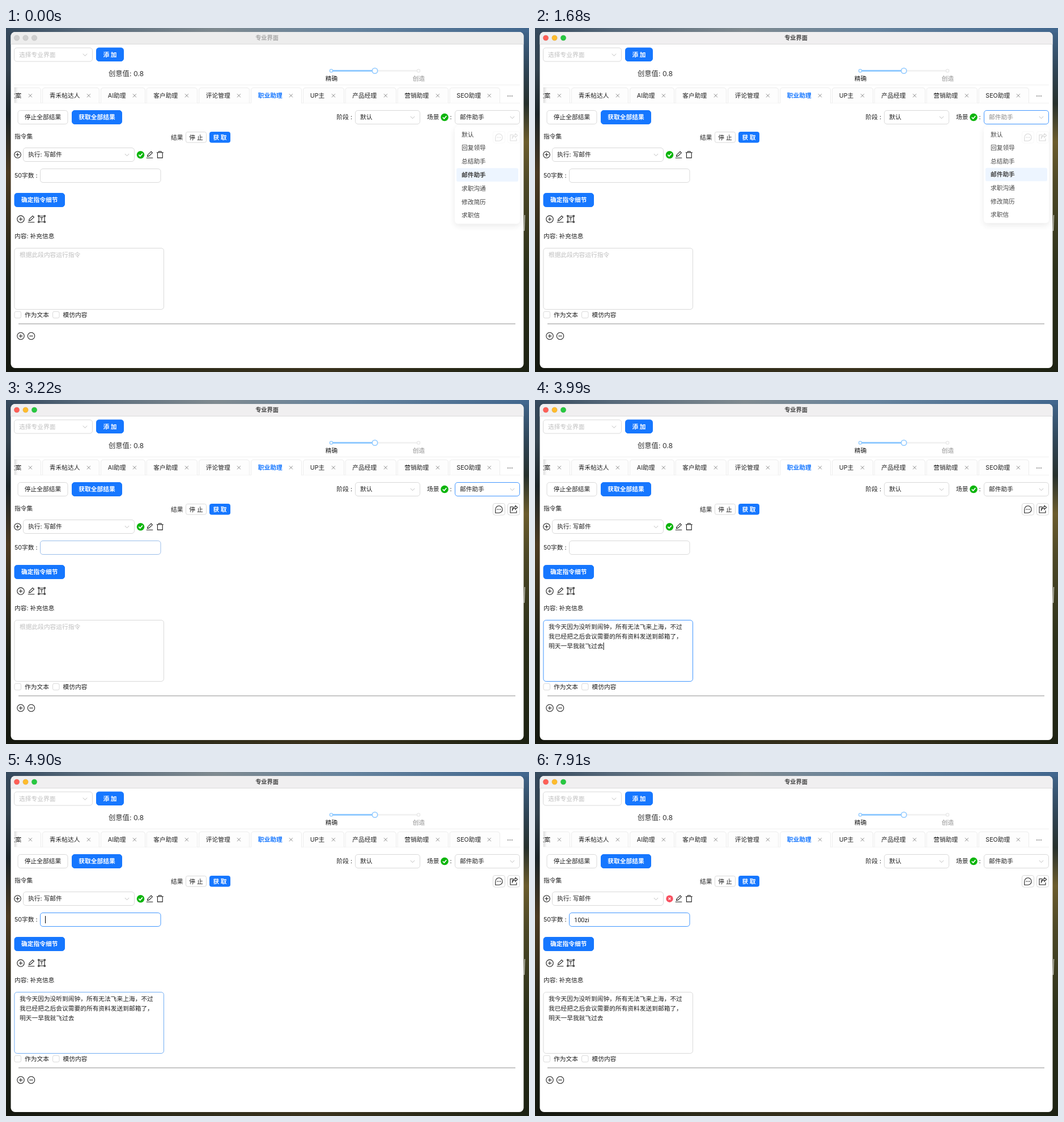
These frames come from a looping animation (923x607 px, 8000 ms). An HTML page:

```html
<!DOCTYPE html>
<html lang="zh-CN">
<head>
<meta charset="utf-8">
<title>专业界面</title>
<style>
html, body { margin: 0; width: 100%; height: 100%; overflow: hidden; background: #222b25; }
svg { display: block; width: 100vw; height: 100vh; }
text { font: 10.72px Inter, "Noto Sans CJK SC", "Noto Sans CJK", sans-serif; white-space: pre; }
#typed { font: 11px Roboto, sans-serif; }
#panel { filter: drop-shadow(0 4.6px 6px rgba(0,0,0,.1)); }
</style>
</head>
<body>
<svg id="stage" viewBox="0 0 923 607" preserveAspectRatio="none"></svg>
<script>
const INK = '#1f1f1f', BLUE = '#1677ff', LINE = '#d9d9d9', MUTED = '#bfbfbf', PALE = '#f0f0f0';

// Drawing helpers; text is placed by its vertical centre.
const label = (x, cy, str, { size = 10.72, color = INK, weight = 400, anchor = 'start', id = '' } = {}) =>
  `<text id="${id}" x="${x}" y="${cy + size * .37}" fill="${color}" text-anchor="${anchor}" style="font-size:${size}px;font-weight:${weight}">${str}</text>`;
const box = (x, y, w, h, { fill = '#fff', stroke = LINE, r = 4.6, id = '' } = {}) =>
  `<rect id="${id}" x="${x}" y="${y}" width="${w}" height="${h}" rx="${r}" fill="${fill}" stroke="${stroke}"/>`;
const circle = (x, y, r, fill, stroke = 'none', width = 1, id = '') =>
  `<circle id="${id}" cx="${x}" cy="${y}" r="${r}" fill="${fill}" stroke="${stroke}" stroke-width="${width}"/>`;
const path = (x, y, d, stroke = INK, width = 1.1) =>
  `<path transform="translate(${x} ${y})" d="${d}" fill="none" stroke="${stroke}" stroke-width="${width}"/>`;

const chevron = (x, y) => path(x, y, 'M-3.6-1.8L0 2 3.6-1.8', MUTED, 1);
const cross = (x, y) => path(x, y, 'M-3-3L3 3M3-3L-3 3', '#8c8c8c', 1);
const plus = (x, y, r = 6.2) => circle(x, y, r, 'none', INK, 1.1) + path(x, y, 'M-3.2 0H3.2M0-3.2V3.2');
const minus = (x, y) => circle(x, y, 6.2, 'none', INK, 1.1) + path(x, y, 'M-3.2 0H3.2');
const pencil = (x, y) => path(x, y, 'M-5.8 5.8H5.8M-4 3L-3.3.2 2.6-5.4 4.9-3.2-1.2 2.4Z');
const check = (x, y) => circle(x, y, 6.8, '#0bb50b') + path(x, y, 'M-3.2 0L-.8 2.5 3.4-2.3', '#fff', 1.7);
const button = (x, y, w, h, str, primary, id, r) =>
  box(x, y, w, h, primary ? { fill: BLUE, stroke: BLUE, id, r } : { r }) +
  label(x + w / 2, y + h / 2, str, { color: primary ? '#fff' : INK, weight: primary ? 600 : 400, anchor: 'middle' });
const select = (x, y, w, str, { color, id = '' } = {}) =>
  box(x, y, w, 24, { id }) + label(x + 8.6, y + 12, str, { color, id: id && id + 'Text' }) + chevron(x + w - 13, y + 12.3);
const gradient = (id, vertical, stops) =>
  `<linearGradient id="${id}" ${vertical ? 'x2="0" y2="1"' : ''}>` +
  stops.map(([at, color]) => `<stop offset="${at}" stop-color="${color}"/>`).join('') + '</linearGradient>';

const wallpaper = () => '<defs>' +
  gradient('sky', false, [[0, '#34485c'], [.15, '#57697a'], [.4, '#7f8a90'], [.65, '#66839d'], [1, '#41668d']]) +
  gradient('leftHill', true, [[0, '#34485c'], [.12, '#33424e'], [.25, '#1b2428'], [.42, '#4b3a22'], [.55, '#3a301d'], [.75, '#1c2016'], [1, '#14170f']]) +
  gradient('rightHill', true, [[0, '#41668d'], [.12, '#2f4556'], [.22, '#26302c'], [.33, '#6b5c2c'], [.45, '#4d4826'], [.7, '#2b3019'], [1, '#1d2213']]) +
  gradient('ground', false, [[0, '#14170f'], [.3, '#2c2a19'], [.6, '#3a321d'], [1, '#1d2213']]) +
  gradient('edge', false, [[0, 'rgba(0,0,0,.13)'], [1, 'rgba(0,0,0,0)']]) +
  '<clipPath id="tabClip"><path d="M14.5 100H908V140H14.5Z"/></clipPath></defs>' +
  '<path fill="url(#leftHill)" d="M0 0H462V607H0Z"/><path fill="url(#rightHill)" d="M462 0H923V607H462Z"/>' +
  '<path fill="url(#sky)" d="M0 0H923V8H0Z"/><path fill="url(#ground)" d="M0 597H923V607H0Z"/>' +
  '<path d="M915.5 330L914.5 358" stroke="#cfd0c8" stroke-width="1.3"/>';

const windowFrame = () =>
  box(8.5, 7, 905, 593, { stroke: 'none', r: 7.5 }) +
  '<path id="titleBar" d="M8.5 28.5V14.5A7.5 7.5 0 0 1 16 7H906A7.5 7.5 0 0 1 913.5 14.5V28.5Z"/>' +
  '<path d="M8.5 28.5H913.5" stroke="#dadada"/>' +
  [19, 34.5, 50].map((x, i) => circle(x, 17.5, 4.8, '#ccc', 'rgba(0,0,0,.12)', .6, 'light' + i)).join('') +
  label(460.5, 17.5, '专业界面', { size: 10.2, weight: 600, anchor: 'middle', id: 'title' });

const header = () =>
  select(14.5, 35, 138, '选择专业界面', { color: MUTED }) + button(159.5, 35, 48, 23.5, '添 加', true) +
  label(181, 80, '创意值: 0.8', { size: 12.3, color: '#333' }) +
  '<path d="M574 75.5H728" stroke="#f2f2f2" stroke-width="3"/><path d="M574 75.5H651" stroke="#91caff" stroke-width="3"/>' +
  circle(574, 75.5, 2.6, '#fff', '#91caff', 1.4) + circle(728, 75.5, 2.6, '#fff', '#e8e8e8', 1.4) +
  circle(651, 75.5, 4.7, '#fff', '#91caff', 1.6) +
  label(574.5, 89, '精确', { anchor: 'middle' }) + label(728.5, 89, '创造', { anchor: 'middle', color: '#8c8c8c' }) +
  `<path d="M14 100.5H907" stroke="${PALE}"/>`;

const TABS = [
  ['文案', -6.5, 61.5], ['青禾帖达人', 64.5, 164.5], ['AI助理', 167.5, 245.5], ['客户助理', 248, 337.5], ['评论管理', 340.5, 429.5],
  ['职业助理', 432.5, 521.5], ['UP主', 524.5, 596.5], ['产品经理', 599, 688.5], ['营销助理', 691, 780.5], ['SEO助理', 783, 871.5]];
const tabs = () => `<g clip-path="url(#tabClip)"><path d="M14 132.5H907" stroke="${PALE}"/>` +
  TABS.map(([name, left, right]) => {
    const active = name === '职业助理';
    return `<path d="M${left} 132.5V110Q${left} 105.5 ${left + 4.6} 105.5H${right - 4.6}Q${right} 105.5 ${right} 110V132.5" fill="${active ? '#fff' : '#fdfdfd'}" stroke="#ececec"/>` +
      (active ? `<path d="M${left + .5} 132.5H${right - .5}" stroke="#fff" stroke-width="1.4"/>` : '') +
      label(left + 12.3, 119, name, active ? { color: BLUE, weight: 600 } : {}) + cross(right - 18.6, 119.3);
  }).join('') + '<path d="M14.5 105H21V132H14.5Z" fill="url(#edge)"/></g>' +
  [886, 889.5, 893].map(x => circle(x, 120, .8, INK)).join('');

const toolbar = () =>
  button(21, 145.5, 88, 24, '停止全部结果') + button(116.5, 145.5, 88, 24, '获取全部结果', true) +
  label(583.5, 157.5, '阶段 :') + select(616.5, 145.5, 114, '默认') +
  label(743, 157.5, '场景') + check(774, 157.5) + label(783.5, 157.5, ':') +
  select(792.5, 145.5, 114, '邮件助手', { id: 'scene' }) +
  label(291, 193, '结果') + button(317.5, 183.5, 36, 18.5, '停 止', false, '', 3) + button(359.5, 183.5, 36, 18.5, '获 取', true, '', 3) +
  box(859.5, 182.5, 21, 20.5, { r: 3.5 }) + box(885.5, 182.5, 21, 20.5, { r: 3.5 }) +
  path(870, 193, 'M-6.2 6.2V0A6.2 6.2 0 1 1 0 6.2Z') + [-2.8, 0, 2.8].map(d => circle(870 + d, 193, .85, INK)).join('') +
  path(896, 193, 'M-1-4.5H-6V6H5V2M-2.6 2.6C-2.4-.5 0-2 3-2V.2L6.7-3.4 3-6.6V-4.5C-.8-4.3-2.8-1.5-2.6 2.6Z');

const form = () =>
  label(15, 191, '指令集') + plus(20.5, 223.5, 5.8) + select(30.5, 211.5, 196, '执行: 写邮件') +
  `<g id="valid">${check(237.5, 223.7)}</g>` +
  `<g id="invalid">${circle(237.5, 223.7, 6.2, '#f8505f') + path(237.5, 223.7, 'M-2-2L2 2M2-2L-2 2', '#fff', 1.2)}</g>` +
  pencil(253.5, 223.5) + path(271.8, 223.5, 'M-6-3.8H6M-2.2-3.8V-5.8H2.2V-3.8M-4.4-3.8V5.6H4.4V-3.8') +
  label(15, 260.5, '50字数 :') + box(60.5, 248.5, 212.5, 24, { id: 'input' }) + label(69, 260.5, '', { size: 11, id: 'typed' }) +
  button(15, 291.5, 88.5, 24, '确定指令细节', true, 'confirm') +
  plus(26, 337.3) + pencil(44.5, 337) +
  path(63, 337, 'M-5-5H5V5H-5ZM-2.8-2.5H2.8M0-2.5V3') +
  [-5.3, 5.3].map(x => [-5.3, 5.3].map(y => box(62 + x, 336 + y, 2, 2, { stroke: INK, r: 0 })).join('')).join('') +
  label(15, 367.5, '内容: 补充信息') + box(14.9, 388.5, 263.6, 108, { id: 'area' }) +
  label(24, 400.5, '根据此段内容运行指令', { color: MUTED, id: 'hint' }) +
  '<g id="note">' + ['我今天因为没听到闹钟，所有无法飞来上海，不过', '我已经把之后会议需要的所有资料发送到邮箱了，', '明天一早我就飞过去']
    .map((line, i) => label(24, 400.5 + i * 17, line)).join('') + '</g>' +
  `<rect id="caret" width="1" height="13" fill="#000"/>` +
  box(15, 500.3, 11.5, 11.5, { r: 2.6 }) + label(33, 506, '作为文本') + box(82.5, 500.3, 11.5, 11.5, { r: 2.6 }) + label(100.5, 506, '模仿内容') +
  '<path d="M22 522H899" stroke="#8e8e8e"/>' + plus(26, 543.5) + minus(44.5, 543.5);

const OPTIONS = ['默认', '回复领导', '总结助手', '邮件助手', '求职沟通', '修改简历', '求职信'];
const dropdown = () => '<g id="menu">' + box(792, 173, 115, 177.6, { stroke: 'none', r: 6, id: 'panel' }) +
  OPTIONS.map((name, i) => {
    const top = 176 + i * 24.5, chosen = name === '邮件助手';
    return (chosen ? box(795, top, 109, 24.5, { fill: '#eaf4ff', stroke: 'none', r: 3 }) : '') +
      label(804, top + 12.25, name, { weight: chosen ? 600 : 400 });
  }).join('') + '</g>';

const stage = document.getElementById('stage');
stage.innerHTML = wallpaper() + windowFrame() + header() + tabs() + toolbar() + form() + dropdown();

const $ = id => document.getElementById(id);
const set = (id, attrs) => { for (const k in attrs) $(id).setAttribute(k, attrs[k]); };
const show = (id, on) => set(id, { visibility: on ? 'visible' : 'hidden' });
const clamp = v => Math.max(0, Math.min(1, v));
const ramp = (t, from, to) => clamp((t - from) / (to - from));
const pulse = (t, a, b, c, d) => ramp(t, a, b) - ramp(t, c, d);
const mix = (a, b, k) => 'rgb(' + a.map((v, i) => Math.round(v + (b[i] - v) * k)) + ')';
const border = k => ({ stroke: mix([217, 217, 217], [64, 150, 255], k) });

function bezier(x1, y1, x2, y2) {
  const at = (a, b, s) => 3 * (1 - s) ** 2 * s * a + 3 * (1 - s) * s * s * b + s ** 3;
  return u => {
    let lo = 0, hi = 1;
    for (let i = 0; i < 24; i++) {
      const mid = (lo + hi) / 2;
      if (at(x1, x2, mid) < u) lo = mid; else hi = mid;
    }
    return at(y1, y2, lo);
  };
}
const easeOut = bezier(.23, 1, .32, 1), easeIn = bezier(.755, .05, .855, .06);

function menuOpenness(t) {
  if (t < 1600) return 1 - easeIn(ramp(t, -140, 60));
  return t < 2590 ? easeOut(ramp(t, 1625, 1825)) : 1 - easeIn(ramp(t, 2590, 2790));
}

const TYPING = [[0, ''], [5950, '1'], [6370, '10'], [6510, '100'], [7140, '100z'], [7280, '100zh'], [7420, '100zhu'], [7770, '100zh'], [7840, '100z'], [7910, '100zi']];
const CARET_ON = [[3500, 4480], [4830, 5390], [5600, 7000], [7140, 7910]];

function draw(t) {
  const active = t >= 980;
  set('titleBar', { fill: active ? '#f0eff0' : '#ededed' });
  set('title', { fill: active ? '#454545' : '#a8a8a8' });
  ['#fe5f57', '#febc2e', '#28c840'].forEach((c, i) => set('light' + i, { fill: active ? c : '#cfcfcf' }));

  const open = menuOpenness(t), scale = .8 + .2 * open;
  set('menu', { opacity: open, transform: `translate(0 ${173 * (1 - scale)}) scale(1 ${scale})` });
  set('sceneText', { fill: t >= 1610 && t < 2590 ? '#8c8c8c' : INK });

  set('scene', border(pulse(t, 980, 1200, 3450, 3680)));
  set('input', border(pulse(t, 3165, 3300, 3310, 3450) + ramp(t, 4520, 4700)));
  set('area', border(pulse(t, 3430, 3640, 4830, 5050)));
  const hover = mix([22, 119, 255], [64, 150, 255], pulse(t, 4170, 4260, 4265, 4340));
  set('confirm', { fill: hover, stroke: hover });

  show('hint', t < 3990);
  show('note', t >= 3990);
  show('valid', t < 5600);
  show('invalid', t >= 5600);

  const value = TYPING.filter(([at]) => at <= t).pop()[1], typed = $('typed');
  if (typed.textContent !== value) typed.textContent = value;
  const inArea = t < 4800;
  show('caret', CARET_ON.some(([from, to]) => t >= from && t < to));
  set('caret', inArea
    ? { x: t < 3990 ? 24 : 120.6, y: t < 3990 ? 394 : 428 }
    : { x: 69 + (value ? typed.getComputedTextLength() : 0), y: 254 });
}

const start = performance.now();
(function frame() {
  draw((performance.now() - start) % 8000);
  requestAnimationFrame(frame);
})();
</script>
</body>
</html>
```
